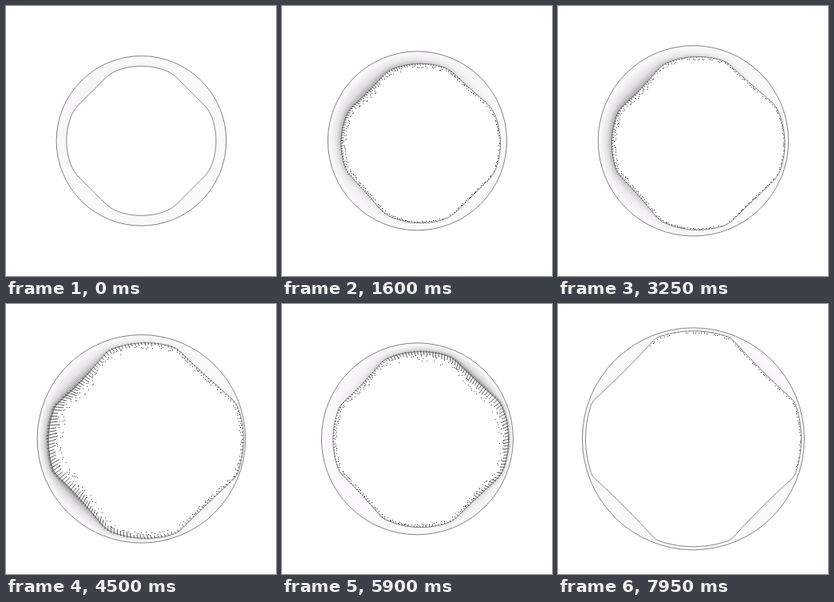
An HTML page with a canvas for the animation above (8000 ms loop, 338 px wide and 338 px high).

```html
<!DOCTYPE html>
<html lang="en">
<head>
<meta charset="utf-8">
<title>Breathing ring</title>
<style>
  html, body { margin: 0; height: 100%; overflow: hidden; background: #fff; }
  canvas { display: block; width: 100vw; height: 100vh; }
</style>
</head>
<body>
<canvas id="stage" width="338" height="338"></canvas>
<script>
const ctx = document.getElementById('stage').getContext('2d');
const LOOP = 8000, STEP = 50, SAMPLES = 360, TAU = Math.PI * 2;
const CX = 169.4, CY = 168.8;

// Outer radius at the turns of each breath: [ms, radius]
const breath = [[0, 106.3], [1100, 119], [1600, 112], [2250, 126.5], [3250, 119.2],
  [3850, 126.5], [4500, 130.3], [5250, 138.7], [5900, 120], [6800, 135.2],
  [7250, 130], [7950, 139]];

// Where the dark side faces: [ms, clockwise degrees from top, hair length, shade]
const moods = [[0, 310, 0, .05], [1600, 308, 4, .45], [3250, 290, 3, .5],
  [4500, 265, 12, .8], [5900, 410, 9, .65], [6800, 398, 15, .75], [7950, 400, 1, .03]];

const mix = (a, b, u) => a + (b - a) * u;
const ease = u => u * u * (3 - 2 * u);
const radians = deg => deg / 360 * TAU;
const noise = n => { const v = Math.sin(n * 127.1 + 31.7) * 43758.5453; return v - Math.floor(v); };
const point = (angle, radius) => [CX + Math.sin(angle) * radius, CY - Math.cos(angle) * radius];
const around = rule => Array.from({ length: SAMPLES }, (_, i) => rule(i / SAMPLES * TAU));

// Eased values of a key list at time t
function valuesAt(keys, t) {
  let i = 0;
  while (i < keys.length - 2 && keys[i + 1][0] <= t) i++;
  const [a, b] = [keys[i], keys[i + 1]];
  const u = ease(Math.min(1, (t - a[0]) / (b[0] - a[0])));
  return a.slice(1).map((v, k) => mix(v, b[k + 1], u));
}

// The hole is a circle cut by four soft chords, leaning to one side mid-way
function innerEdge(t, outer) {
  const p = t / LOOP;
  const swing = outer - mix(107, 133, p);
  const gap = 12.5 - 7 * p * p - .25 * swing;
  const depth = 6 + 6 * p + .3 * swing;
  const lean = 7 * Math.sin(Math.PI * p ** .8);
  const leanAngle = radians(mix(315, 270, p));
  const soft = mix(4, 1.5, p);
  return around(angle => {
    const sector = Math.floor(angle / (TAU / 4));
    const fromLobe = angle - (sector + .5) * TAU / 4;
    const cut = depth - outer * (1 / Math.cos(fromLobe) - 1);
    const lobe = (cut + Math.hypot(cut, soft)) / 2;
    const rim = gap + lean * Math.cos(angle - leanAngle) + lobe;
    return outer - Math.max(2.5, rim);
  });
}

function trace(radii) {
  radii.forEach((r, i) => {
    const xy = point(i / SAMPLES * TAU, r);
    i ? ctx.lineTo(...xy) : ctx.moveTo(...xy);
  });
  ctx.closePath();
}

function drawShade(inner, outer, shade) {
  ctx.lineWidth = 2.8;
  for (let i = 0; i < SAMPLES; i++) {
    if (shade[i] < .02) continue;
    const a = i / SAMPLES * TAU;
    const from = point(a, inner[i]), to = point(a, mix(inner[i], outer, .85));
    const fade = ctx.createLinearGradient(...from, ...to);
    fade.addColorStop(0, `rgba(80,78,80,${shade[i] * .7})`);
    fade.addColorStop(.4, `rgba(100,98,100,${shade[i] * .25})`);
    fade.addColorStop(1, 'rgba(120,118,120,0)');
    ctx.strokeStyle = fade;
    ctx.beginPath();
    ctx.moveTo(...from);
    ctx.lineTo(...to);
    ctx.stroke();
  }
}

function drawHair(inner, hair) {
  ctx.strokeStyle = ctx.fillStyle = '#444';
  ctx.lineWidth = .9;
  ctx.beginPath();
  for (let i = 0; i < SAMPLES; i++) {
    if (hair[i] < .6) continue;
    const a = i / SAMPLES * TAU, reach = hair[i] * (.5 + .5 * noise(i));
    if (i % 2 === 0) {
      ctx.moveTo(...point(a, inner[i] + reach * .25));
      ctx.lineTo(...point(a + reach * .003, inner[i] - reach));
    }
    if (noise(i + 500) < .6) {
      const [x, y] = point(a, inner[i] - 1 - hair[i] * (.5 + noise(i + 900)));
      ctx.fillRect(Math.round(x), Math.round(y), 1, 1);
    }
  }
  ctx.stroke();
}

function draw(t) {
  const [outer] = valuesAt(breath, t);
  const [facing, hairLength, darkness] = valuesAt(moods, t);
  const inner = innerEdge(t, outer);
  const glow = around(a => (.5 + .5 * Math.cos(a - radians(facing))) ** 2);

  ctx.fillStyle = '#fff';
  ctx.fillRect(0, 0, 338, 338);

  ctx.beginPath();
  ctx.arc(CX, CY, outer, 0, TAU);
  trace(inner);
  ctx.fillStyle = '#faf8fa';
  ctx.fill('evenodd');

  drawShade(inner, outer, glow.map(g => darkness * g));
  drawHair(inner, glow.map(g => hairLength * mix(.2, 1, g)));

  ctx.lineWidth = .8;
  ctx.strokeStyle = '#666';
  ctx.beginPath();
  trace(inner);
  ctx.stroke();
  ctx.beginPath();
  ctx.arc(CX, CY, outer, 0, TAU);
  ctx.stroke();
}

const start = performance.now();
function frame() {
  const t = (performance.now() - start) % LOOP;
  draw(Math.floor(t / STEP) * STEP);
  requestAnimationFrame(frame);
}
frame();
</script>
</body>
</html>
```
